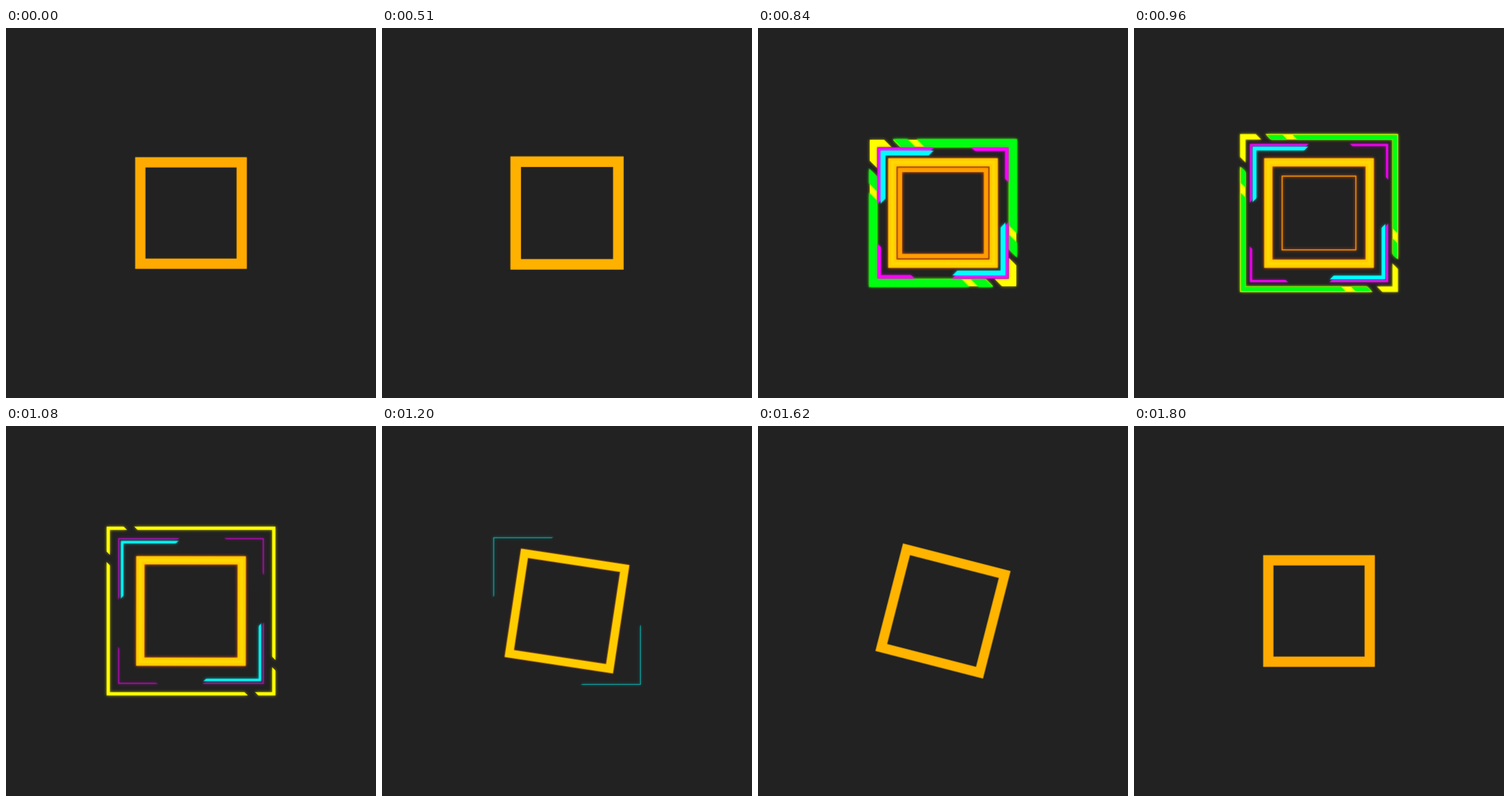
Recreate the animation shown at these times as an HTML page without scripts. Size 540 by 540 pixels, loop 1830 ms.

```html
<!DOCTYPE html>
<html lang="en">
<head>
<meta charset="utf-8">
<title>Square burst</title>
<style>
  html, body { margin: 0; width: 100%; height: 100%; overflow: hidden; background: #222; }
  svg { display: block; width: 100vw; height: 100vh; }
  rect { fill: none; }

  .anim { animation: 1830ms linear infinite; }
  .yellow { stroke: #ff0; animation-name: yellow; }
  .green { stroke: #0f1; animation-name: green; }
  .magenta { stroke: #f0f; animation-name: magenta; }
  .cyan { stroke: #0ff; animation-name: cyan; }
  .inner { stroke: #ffa000; animation-name: inner; }
  .main { animation-name: main; }
  .core { stroke: #ffd800; stroke-width: 6; transform: scale(.74); animation-name: core; }
  .tilt { animation-name: tilt; }
  .heat { animation-name: heat; }

  .glow-yellow { filter: drop-shadow(0 0 2px #ff09); }
  .glow-green { filter: drop-shadow(0 0 2px #0f19); }
  .glow-magenta { filter: drop-shadow(0 0 2px #f0f9); }
  .glow-cyan { filter: drop-shadow(0 0 2px #0ff9); }
  .glow-inner { filter: drop-shadow(0 0 2px #f50); }

  /* Every ring is a 200-unit square; scale sets its radius. */
  @keyframes yellow {
    0%, 34.3% { transform: scale(.84); stroke-width: 23; opacity: 0; }
    34.43% { transform: scale(.845); stroke-width: 23; opacity: 1; }
    45.9% { transform: scale(1.015); stroke-width: 10.5; }
    59.02% { transform: scale(1.2075); stroke-width: 4; opacity: 1; }
    64.8% { transform: scale(1.29); stroke-width: .5; opacity: .6; }
    64.9%, 100% { transform: scale(1.29); stroke-width: .5; opacity: 0; }
  }
  @keyframes green {
    0%, 31.9% { transform: scale(.83); stroke-width: 24; opacity: 0; }
    32% { transform: scale(.835); stroke-width: 24; opacity: 1; }
    34.43% { transform: scale(.87); stroke-width: 23; }
    45.9% { transform: scale(1.02); stroke-width: 11.8; }
    57.9% { transform: scale(1.18); stroke-width: .5; opacity: 1; }
    58%, 100% { transform: scale(1.18); stroke-width: .5; opacity: 0; }
  }
  @keyframes magenta {
    0%, 34.9% { transform: scale(.82); stroke-width: 8; opacity: 0; }
    35% { transform: scale(.825); stroke-width: 8; opacity: 1; }
    45.9% { transform: scale(.93); stroke-width: 5.4; opacity: 1; }
    59.02% { transform: scale(1.055); stroke-width: 1.2; opacity: .8; }
    63% { transform: scale(1.09); stroke-width: .5; opacity: .3; }
    63.1%, 100% { transform: scale(1.09); stroke-width: .5; opacity: 0; }
  }
  @keyframes cyan {
    0%, 37.6% { transform: scale(.79); stroke-width: 11; opacity: 0; }
    37.7% { transform: scale(.795); stroke-width: 11; opacity: 1; }
    45.9% { transform: scale(.875); stroke-width: 8; }
    59.02% { transform: scale(1.005); stroke-width: 3.4; opacity: 1; }
    65.57% { transform: scale(1.07); stroke-width: 1; opacity: .7; }
    67.9% { transform: scale(1.09); stroke-width: .5; opacity: .2; }
    68%, 100% { transform: scale(1.09); stroke-width: .5; opacity: 0; }
  }
  @keyframes inner {
    0%, 35% { transform: scale(.78); stroke-width: 14; opacity: 0; }
    35.1% { transform: scale(.78); stroke-width: 14; opacity: 1; }
    45.9% { transform: scale(.63); stroke-width: 10.3; }
    54.5% { transform: scale(.51); stroke-width: .5; opacity: 1; }
    54.6%, 100% { transform: scale(.51); stroke-width: .5; opacity: 0; }
  }
  @keyframes main {
    0%, 27.3% { transform: scale(.74); stroke-width: 20.3; stroke: #fa0; }
    34.43% { transform: scale(.845); stroke-width: 23.7; stroke: #ff0; }
    45.9%, 65.57% { transform: scale(.74); stroke-width: 16.2; stroke: #fc0; }
    98.36%, 100% { transform: scale(.74); stroke-width: 20.3; stroke: #fa0; }
  }
  @keyframes core {
    0%, 42% { opacity: 0; }
    45.9%, 59.02% { opacity: 1; }
    65%, 100% { opacity: 0; }
  }
  @keyframes tilt {
    0%, 59.02% { transform: rotate(0deg); }
    65.57% { transform: rotate(8.6deg); }
    78.69% { transform: rotate(13.6deg); }
    85.8% { transform: rotate(16deg); animation-timing-function: ease-in-out; }
    98.36%, 100% { transform: rotate(0deg); }
  }
  @keyframes heat {
    0%, 27.3% { filter: drop-shadow(0 0 2px #f500); }
    34.43% { filter: drop-shadow(0 0 1.5px #f50a); }
    45.9%, 59.02% { filter: drop-shadow(0 0 2px #f50f); }
    65.57% { filter: drop-shadow(0 0 1.5px #f508); }
    80%, 100% { filter: drop-shadow(0 0 2px #f500); }
  }
</style>
</head>
<body>
<svg viewBox="0 0 540 540">
  <defs>
    <g id="slits" stroke="#000" stroke-width="9">
      <path d="M-93-120l40 40M-120-83.5l40 40"/>
    </g>
    <g id="cuts" stroke="#000">
      <path stroke-width="54" d="M-142-138l80 80"/>
      <path stroke-width="9.5" d="M-58.500-120l40 40M-120-50l40 40"/>
    </g>
    <mask id="yellowMask">
      <path fill="#fff" d="M-130-130h260v260h-260z"/>
      <use href="#slits"/>
      <use href="#slits" transform="rotate(180)"/>
    </mask>
    <mask id="greenMask">
      <path fill="#fff" d="M-130-130h260v260h-260z"/>
      <use href="#cuts"/>
      <use href="#cuts" transform="rotate(180)"/>
    </mask>
    <clipPath id="magentaClip">
      <path d="M-130-130H13L-130 13zM130 130H-13L130-13z"/>
      <path d="M15-130H130V-23zM-15 130H-130V23z"/>
    </clipPath>
    <clipPath id="cyanClip">
      <path d="M-130-130H10L-130 10zM130 130H-10L130-10z"/>
    </clipPath>
  </defs>

  <g transform="translate(270 270)">
    <g class="glow-yellow">
      <rect class="anim yellow" x="-100" y="-100" width="200" height="200" mask="url(#yellowMask)"/>
    </g>
    <g class="glow-green">
      <rect class="anim green" x="-100" y="-100" width="200" height="200" mask="url(#greenMask)"/>
    </g>
    <g class="glow-magenta">
      <rect class="anim magenta" x="-100" y="-100" width="200" height="200" clip-path="url(#magentaClip)"/>
    </g>
    <g class="glow-cyan">
      <rect class="anim cyan" x="-100" y="-100" width="200" height="200" clip-path="url(#cyanClip)"/>
    </g>
    <g class="glow-inner">
      <rect class="anim inner" x="-100" y="-100" width="200" height="200"/>
    </g>
    <g class="anim heat">
      <g class="anim tilt">
        <rect class="anim main" x="-100" y="-100" width="200" height="200"/>
        <rect class="anim core" x="-100" y="-100" width="200" height="200"/>
      </g>
    </g>
  </g>
</svg>
</body>
</html>
```
